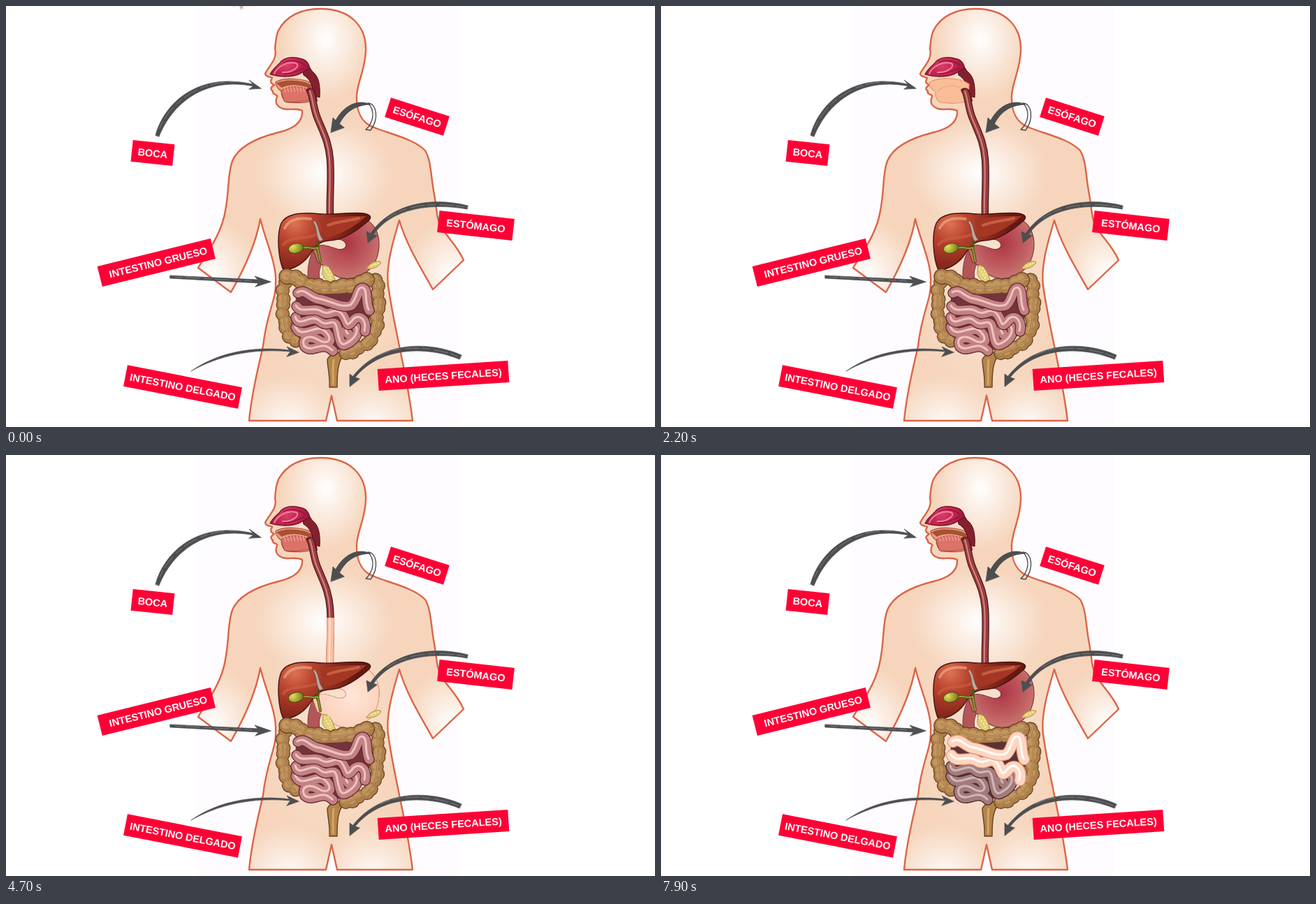
These frames come from a looping animation (929x603 px, 8 s). An HTML page:

```html
<!DOCTYPE html>
<html lang="es">
<head>
<meta charset="utf-8">
<title>Aparato digestivo</title>
<style>
html, body { margin: 0; width: 100%; height: 100%; overflow: hidden; background: #fff; }
svg { display: block; width: 929px; height: 603px; }
text { font: bold 14.5px "Liberation Sans", Arial, sans-serif; fill: #fff; text-anchor: middle; }
</style>
</head>
<body>
<svg id="stage" viewBox="0 0 929 603" fill="none" stroke-linecap="round" stroke-linejoin="round"></svg>
<script>
const stage = document.getElementById('stage');
const LOOP = 8000, STEP = 100;

const body = `M450 4C494 4 516 30 515 64C514 92 504 105 502 128C501 152 510 168 527 174
  C548 183 584 190 600 207C609 222 608 245 613 270C617 292 616 304 623 317C634 334 647 345 655 364L611 406
  C597 380 574 345 563 307C553 340 542 378 548 407C553 440 558 462 563 487C572 530 578 560 582 594
  L474 594L466 558L458 594L348 594C352 550 362 515 368 487C373 440 387 420 386 397C388 370 371 335 364 305
  C358 340 342 375 322 410L275 375C290 350 309 325 314 293C320 262 317 240 324 222
  C334 198 366 187 390 181C412 176 425 166 424 150C414 145 405 150 396 147C386 143 385 137 388 130
  C390 126 380 128 382 122C377 118 380 116 384 113C377 110 379 107 381 103C378 101 372 102 371 97
  C376 86 389 76 385 62C386 52 386 44 390 35C401 14 423 4 450 4Z`;

const gut = [
  'M418 411C430 404 434 418 448 420C466 423 480 434 494 429C504 421 502 404 511 404C519 406 514 425 520 436',
  'M416 430C424 443 440 430 452 438C464 446 470 432 480 440C490 450 486 464 496 452C504 440 518 448 514 466',
  'M415 446C420 464 438 440 450 452C460 462 470 446 474 460C478 476 478 490 488 484C500 478 508 466 500 458C490 452 484 462 490 470',
  'M415 460C424 480 445 455 457 466C472 480 460 487 448 479C435 471 422 476 428 488C440 499 452 478 468 494'
];
const gullet = 'M436 123C440 133 440 147 446 161C455 183 462 195 464 220C466 250 463 275 464 302';
const stomach = `M470 310L505 304C528 305 537 330 533 352C528 380 505 392 484 390C464 388 459 371 446 367
  L440 350C446 338 460 343 471 347C481 351 489 347 486 340C483 334 474 333 468 335L452 337Z`;
const duodenum = 'M442 346C434 357 430 380 433 393L451 395C447 388 447 378 453 368Z';
const pharynx = 'M429 120C433 115 440 117 444 123L446 137L440 137C438 127 431 129 429 120Z';

const line = (d, color, w, extra = '') => `<path d="${d}" stroke="${color}" stroke-width="${w}" ${extra}/>`;
const shape = (d, fill, color = 'none', w = 1, extra = '') =>
  `<path d="${d}" fill="${fill}" stroke="${color}" stroke-width="${w}" ${extra}/>`;
const tube = (d, w, edge, mid, shine) =>
  line(d, edge, w) + line(d, mid, w - 2.5) + line(d, shine, w * .2, 'transform="translate(-1 -1)"');
const radial = (id, x, y, r, stops) =>
  `<radialGradient id="${id}" gradientUnits="userSpaceOnUse" cx="${x}" cy="${y}" r="${r}">` +
  stops.map(([o, c]) => `<stop offset="${o}" stop-color="${c}"/>`).join('') + '</radialGradient>';
const glow = (x, y, rx, ry, o = 1) =>
  `<ellipse cx="${x}" cy="${y}" rx="${rx}" ry="${ry}" fill="url(#glow)" opacity="${o}"/>`;

// Pouched tube made of overlapping beads along a path
function beads(d, r, gap) {
  const p = document.createElementNS('http://www.w3.org/2000/svg', 'path');
  p.setAttribute('d', d);
  const len = p.getTotalLength(), pts = [];
  for (let s = 0, i = 0; s <= len; s += gap, i++) {
    const { x, y } = p.getPointAtLength(s);
    pts.push([x + Math.sin(i * 2.3) * 1.5, y + Math.cos(i * 2.3) * 1.5]);
  }
  const dots = (rad, c, shift = 0) =>
    pts.map(([x, y]) => `<circle cx="${(x + shift).toFixed(1)}" cy="${(y + shift).toFixed(1)}" r="${rad}" fill="${c}"/>`).join('');
  return dots(r + 1.2, '#65411f') + dots(r, '#ad7f4b') + dots(r * .6, '#c2965d', -1.5) +
    line(d, '#85603a', 2.4) + line(d, '#cda26a', 1.3);
}

function label(text, x, y, w, h, turn, dx = 0) {
  return `<g transform="translate(${x} ${y}) rotate(${turn})">
    <rect x="${-w / 2}" y="${-h / 2}" width="${w}" height="${h}" fill="#ff0036"/><text x="${dx}" y="5.4">${text}</text></g>`;
}

const defs = `<defs>
  ${radial('nose', 402, 84, 36, [[0, '#d9406b'], [.45, '#c4254f'], [1, '#8e1737']])}
  ${radial('belly', 487, 340, 58, [[0, '#ad3444'], [.6, '#bf5f61'], [1, '#cf8079']])}
  ${radial('bellyLit', 494, 345, 55, [[0, '#ffe6d8'], [1, '#fbcdb5']])}
  ${radial('liver', 414, 312, 88, [[0, '#dd7352'], [.3, '#b9432e'], [.65, '#8c2a1e'], [1, '#661811']])}
  ${radial('bile', 411, 344, 15, [[0, '#e2de62'], [1, '#777a15']])}
  <radialGradient id="glow"><stop stop-color="#fff"/><stop offset=".4" stop-color="#fff" stop-opacity=".58"/>
    <stop offset="1" stop-color="#fff" stop-opacity="0"/></radialGradient>
  <clipPath id="skin"><path d="${body}"/></clipPath>
  <filter id="soft" x="-40%" y="-40%" width="180%" height="180%"><feGaussianBlur stdDeviation="1.8"/></filter>
</defs>`;

const figure = `<rect x="273" width="376" height="603" fill="#fefcfe"/>
  ${shape(body, '#f6d5bc')}
  <g clip-path="url(#skin)">
    ${glow(458, 48, 66, 88)}${glow(455, 238, 100, 76)}
    ${glow(296, 385, 66, 80)}${glow(637, 386, 66, 80)}
    ${glow(405, 600, 78, 72, .9)}${glow(525, 600, 78, 72, .9)}${glow(466, 390, 100, 180, .35)}
  </g>${line(body, '#db6547', 2.4)}`;

const teeth = Array.from({ length: 8 }, (_, i) =>
  line(`M${398 + i * 4.5} ${115 + Math.abs(i - 4) * .4}l2 7`, '#f0b5a4', 1)).join('');
const mouth = shape('M386 109C396 102 427 103 440 112L440 133C434 140 417 139 402 138C397 135 394 130 394 122C388 118 386 114 386 109Z', '#ef9b80', '#a6503b', 1.2) +
  shape('M387 111C397 104 428 105 440 115L439 122C428 112 406 111 395 117Z', '#a85135') +
  shape('M394 121C406 113 428 114 438 124L439 132C430 138 412 138 399 137Z', '#dd7268', '#9f3e39', .8) + teeth;
const throat = shape('M425 80C434 82 435 91 440 95C448 102 450 114 449 131L440 128C440 115 435 104 426 99Z', '#85202e', '#501018', 1) +
  shape('M378 98C382 89 391 84 394 79C402 73 412 73 420 75C429 76 435 83 434 90C428 91 424 98 411 100C398 102 388 101 378 98Z', 'url(#nose)', '#721330', 1.3) +
  line('M384 97C388 87 402 79 415 82C423 86 409 96 396 95', '#f0809c', 2) +
  line('M397 81C406 76 420 78 428 85M398 97C410 98 419 91 427 89', '#8f1239', 1.3);
const gulletBase = shape(pharynx, '#75212a') + tube(gullet, 10.5, '#4f1a1c', '#9b3b3e', '#cf8580');

const pancreas = shape('M454 372C460 368 469 382 471 393C466 399 456 394 453 384Z', '#e3cf78', '#a68e3d', 1) +
  shape('M516 376C522 366 533 364 537 367C534 374 523 378 516 376Z', '#e3cf78', '#a68e3d', 1) +
  line('M456 376l9 15M461 375l6 13M523 372l10-4', '#f6eba9', 2, 'stroke-dasharray="1 4"');
const liver = shape(`M396 376C390 360 387 328 394 311C401 298 419 296 440 297C468 301 490 294 512 297
    C524 299 524 304 516 310C502 322 482 336 462 336C447 337 441 346 434 357C424 371 406 380 396 376Z`, 'url(#liver)', '#481310', 1.4) +
  shape('M449 307C464 302 490 301 516 301C503 313 479 329 456 332Z', '#a33724') +
  line('M461 314C476 308 490 308 505 304', '#d87353', 4, 'opacity=".65"') +
  line('M399 318C406 304 423 303 436 305', '#efaa8a', 4, 'opacity=".65"') +
  line('M397 342C406 329 427 335 443 328', '#cd6548', 4, 'opacity=".55"') +
  shape('M441 307C449 313 446 325 454 335L449 337C443 329 446 318 440 310Z', '#bbaaa0', '#685047', .7) +
  line('M424 347C434 343 437 350 446 346L450 366M447 338L446 350', '#505414', 4) +
  line('M424 347C434 343 437 350 446 346L450 366', '#a3a53a', 1.6) +
  '<ellipse cx="415" cy="347" rx="11" ry="7" fill="url(#bile)" stroke="#4f4b12" transform="rotate(-12 415 347)"/>';

const colon = shape('M460 506C466 495 483 494 483 501C475 509 474 526 474 546L463 546C464 529 460 518 460 506Z', '#b58449', '#65411f', 1.4) +
  line('M469 507C467 518 469 531 468 542', '#d3a667', 3) +
  beads('M529 391C536 412 533 440 530 461C526 482 511 490 480 500', 9, 11) +
  beads('M402 386C394 409 396 436 399 456C402 469 408 476 414 480', 9, 11) +
  beads('M402 386C417 390 427 399 448 403C478 407 501 398 526 391', 10.5, 12);
const bowel = shape('M415 414L515 410L523 438L514 470L485 488L467 497L428 491L413 450Z', '#75343b') +
  gut.map(d => tube(d, 15.5, '#632832', '#c48183', '#ebc3bf')).reverse().join('');

// Pale overlays, each revealed and hidden by a moving clip edge
const litGut = d => tube(d, 16.5, '#e89c7d', '#fcd6c2', '#fffaf4');
const lit = [
  { art: shape('M384 110C394 102 427 101 441 112L440 133C434 141 416 140 400 138C395 135 392 130 393 123C387 119 384 115 384 110Z', '#f9bd98', '#ed9870', 1.2) +
      line('M396 122C407 111 426 112 437 123', '#f5a981', 1.3),
    axis: 'x', box: [382, 100, 62, 44], show: [1100, 1900], hide: [2700, 3500] },
  { art: shape(pharynx, '#f9bd9f') + tube(gullet, 11, '#e69b7c', '#f9bfa3', '#fde0d1'),
    axis: 'y', box: [425, 115, 50, 186], show: [2700, 3700], hide: [4000, 5100] },
  { art: shape(duodenum, '#fccfb9', '#efb296', 1),
    axis: 'y', box: [428, 342, 30, 55], show: [4800, 5300], hide: [6800, 7500] },
  { art: shape(stomach, 'url(#bellyLit)', '#efb296', 1.2),
    axis: 'y', box: [430, 302, 108, 92], show: [3700, 4600], hide: [6300, 7400] },
  { art: litGut(gut[1]), axis: 'y', box: [404, 418, 126, 60], show: [7200, 7900] },
  { art: litGut(gut[0]), axis: 'y', box: [404, 394, 130, 54], show: [5500, 6300] }
];
const layer = i => {
  const [x, y, w, h] = lit[i].box;
  return `<clipPath id="clip${i}"><rect id="edge${i}" x="${x}" y="${y}" width="${w}" height="${h}"/></clipPath>
    <g clip-path="url(#clip${i})">${lit[i].art}</g>`;
};

const ink = '#4d4e50';
const stroke = (d, scratch) => shape(d, ink, ink, .7) + line(scratch, '#8f8f92', .7, 'stroke-dasharray="11 4 20 7"');
const head = d => shape(d, ink, ink, .8);
const arrows =
  stroke('M214 185C226 140 275 92 357 113L355 115C285 101 238 139 219 187Z', 'M220 175C236 137 280 104 335 109') +
  head('M365 118L348 106L355 114L348 119Z') +
  line('M515 177C525 168 530 151 518 139C531 140 534 161 522 178Z', ink, 1.4) +
  shape('M521 141C502 132 481 145 471 166L477 169C487 150 501 142 521 141Z', ink, ink) +
  head('M465 181L468 160L474 166L484 174Z') +
  stroke('M661 286C610 273 551 282 521 327L525 329C552 288 611 282 660 291Z', 'M656 288C620 281 575 283 546 304') +
  head('M518 339L516 323L522 326L531 329Z') +
  stroke('M235 386L362 392L362 397L235 390Z', 'M242 388L352 394') +
  head('M379 395L356 387L363 395L357 402Z') +
  shape('M265 523C300 498 350 486 406 493L406 495C350 490 302 502 265 523Z', ink, ink, .6) +
  head('M419 496L402 488L407 495L402 502Z') +
  stroke('M652 500C610 481 538 477 496 531L499 533C538 484 609 489 649 506Z', 'M647 502C612 488 565 485 535 500') +
  head('M492 545L492 527L497 531L506 534Z');

const labels = label('BOCA', 210, 210.5, 60, 31, 6) + label('ESÓFAGO', 588.5, 158.5, 88, 29, 17.7) +
  label('ESTÓMAGO', 672.5, 314.5, 108, 31, 6.4) + label('INTESTINO GRUESO', 215.3, 367.5, 167, 30, -13.9, 2.5) +
  label('INTESTINO DELGADO', 253, 545.5, 167, 31, 11) + label('ANO (HECES FECALES)', 626, 529.5, 187, 31, -3.7);

const apple = `<g id="apple"><g filter="url(#soft)">
  <path d="M0 -23C13 -27 23 -15 22 0C21 13 10 20 0 18C-13 21 -22 12 -22 -1C-22 -17 -12 -26 0 -23Z" fill="#f23632"/>
  <ellipse cx="-22" cy="14" rx="8" ry="5" fill="#99884c" transform="rotate(-12 -22 14)"/>
  </g><path d="M-8 8C-10 13 -14 17 -13 23" stroke="#96694c" stroke-width="2.5" filter="url(#soft)"/></g>`;

stage.innerHTML = defs + figure + mouth + throat + layer(0) + gulletBase + layer(1) +
  shape(duodenum, '#b2565a', '#7e343a') + layer(2) +
  shape(stomach, 'url(#belly)', '#80343a', 1.2) + layer(3) + pancreas + liver + colon +
  `<g id="bowel">${bowel}</g>` + layer(4) + layer(5) + apple + arrows + labels;

const el = id => document.getElementById(id);
const part = (t, [a, b]) => Math.min(1, Math.max(0, (t - a) / (b - a)));

function draw(t) {
  el('apple').setAttribute('transform', `translate(350 ${-20 + 138 * part(t, [0, 600])})`);
  el('apple').setAttribute('opacity', 1 - part(t, [600, 1100]));
  lit.forEach(({ axis, box, show, hide }, i) => {
    const k = axis === 'x' ? 0 : 1;
    const from = hide ? part(t, hide) : 0, to = part(t, show);
    const edge = el('edge' + i);
    edge.setAttribute(axis, box[k] + box[k + 2] * from);
    edge.setAttribute(k ? 'height' : 'width', box[k + 2] * Math.max(0, to - from));
  });
  const dim = part(t, [5000, 7000]);
  el('bowel').style.filter = `saturate(${1 - .35 * dim}) brightness(${1 - .08 * dim})`;
}

const start = performance.now();
(function tick() {
  const t = (performance.now() - start) % LOOP;
  draw(Math.floor(t / STEP) * STEP);
  requestAnimationFrame(tick);
})();
</script>
</body>
</html>
```
